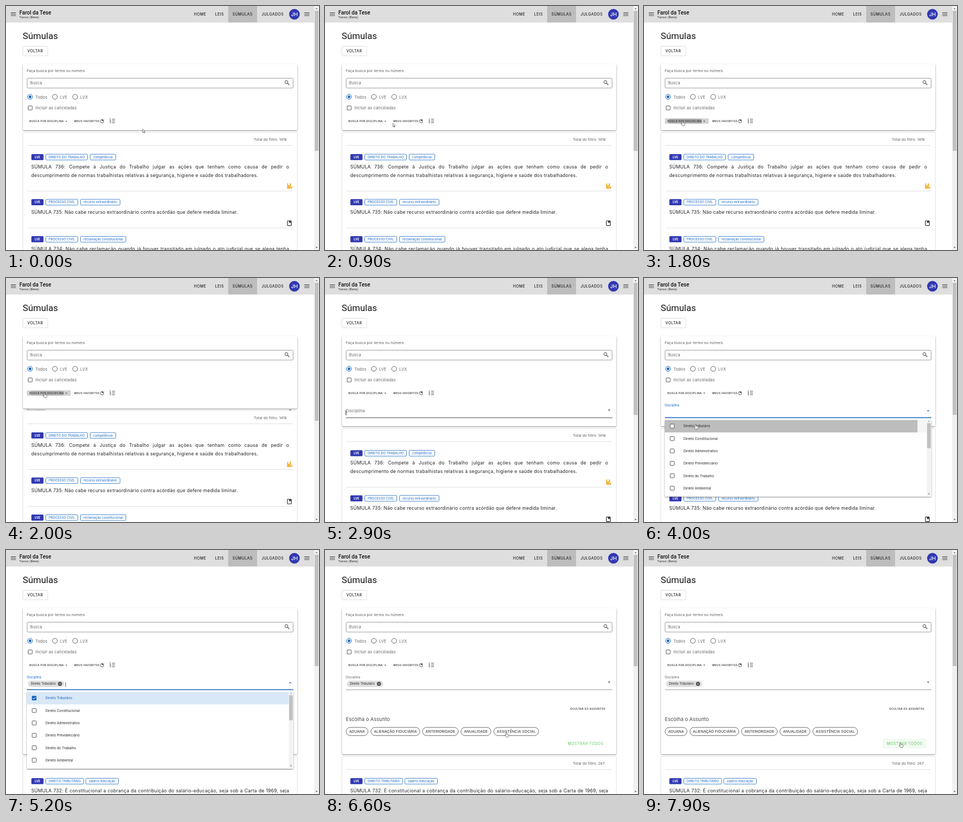
An HTML page that plays this animation: 586 by 458 pixels, repeating every 8000 ms.

```html
<!DOCTYPE html>
<html lang="pt">
<head>
<meta charset="utf-8">
<title>Súmulas</title>
<style>
html, body { margin: 0; width: 100%; height: 100%; overflow: hidden; background: #fff }
svg { display: block; width: 586px; height: 458px; font-family: Inter, sans-serif; fill: #222 }
.brand { font: 500 10px Roboto, sans-serif; fill: #111 }
.sub { font: 6px Roboto, sans-serif; letter-spacing: .3px }
.title { font: 17px Roboto, sans-serif; fill: #111 }
.nav { font-size: 6.9px; font-weight: 500; letter-spacing: .5px }
.avatar { font-size: 9.5px; font-weight: 500; fill: #fff }
.hint { font-size: 6.7px; letter-spacing: .12px; fill: #555 }
.field { font-size: 7.4px; letter-spacing: .2px; fill: #666 }
.tiny { font-size: 4.8px; font-weight: 500; letter-spacing: .42px }
.tag { font-size: 5.9px; letter-spacing: .04px; fill: #1565c0 }
.court { font-size: 5.6px; font-weight: 700; fill: #fff }
.label { font-size: 5.9px; fill: #666 }
.chip { font-size: 5.9px }
.option { font-size: 6.35px }
.heading { font-size: 9.2px; letter-spacing: .15px; fill: #444 }
.pill { font-size: 6.8px; letter-spacing: .1px }
.law { font: 8.6px/14px Inter, sans-serif; letter-spacing: .26px; color: #222; white-space: nowrap }
.full { text-align-last: justify }
.shade { filter: drop-shadow(0 1px 1.3px #0007) }
</style>
</head>
<body>
<svg id="stage" viewBox="0 0 586 458"></svg>
<script>
const stage = document.getElementById('stage');
const BLUE = '#1565c0', INDIGO = '#3038b0', GREEN = '#76d275';

const clamp = v => Math.max(0, Math.min(1, v));
const ease = (t, a, b) => { const k = clamp((t - a) / (b - a)); return k * k * (3 - 2 * k); };

// Vertical positions of text are the middle of the capitals.
const text = (x, y, cls, s, more = '') => `<text x="${x}" y="${y}" dy=".36em" class="${cls}" ${more}>${s}</text>`;
const mid = 'text-anchor="middle"';
const rect = (x, y, w, h, fill, more = '') => `<rect x="${x}" y="${y}" width="${w}" height="${h}" fill="${fill}" ${more}/>`;
const path = (d, fill, more = '') => `<path d="${d}" fill="${fill}" ${more}/>`;
const line = (x1, x2, y, color, w = 1) => path(`M${x1} ${y}H${x2}`, 'none', `stroke="${color}" stroke-width="${w}"`);
const ring = (x, y, r, color) => `<circle cx="${x}" cy="${y}" r="${r}" fill="none" stroke="${color}"/>`;
const dot = (x, y, r, color) => `<circle cx="${x}" cy="${y}" r="${r}" fill="${color}"/>`;
const burger = x => [12.5, 15.2, 18].map(y => line(x, x + 9.5, y, '#333', .9)).join('');
const arrow = (x, y, r, up, fill = '#444') => path(`M${x - r} ${y}h${2 * r}l${-r} ${up ? -r : r}z`, fill);
const law = (y, s, full) => `<foreignObject x="47.3" y="${y - 7}" width="483" height="15"><div class="law ${full ? 'full' : ''}">${s}</div></foreignObject>`;

function checkbox(x, y, on) {
  return on
    ? rect(x, y, 8.5, 8.5, BLUE, 'rx="1"') + path(`M${x + 1.7} ${y + 4.3}l2 2l3.4-3.9`, 'none', 'stroke="#fff"')
    : rect(x + .5, y + .5, 7.6, 7.6, '#fff', 'rx=".8" stroke="#555"');
}

function bookmark(x, y, s) {
  return rect(x, y, 7.5 * s, 8.8 * s, 'none', `rx=".8" stroke="#222" stroke-width="${1.1 * s}"`) +
    path(`M${x + 3.4 * s} ${y}h${3 * s}v${4.3 * s}l${-1.5 * s} ${-s}l${-1.5 * s} ${s}z`, '#222');
}

function favorite(x, y) {
  return path(`M${x} ${y}h7.5v5l-2 1v4H${x}z`, '#f5b53d') +
    path(`M${x + 2} ${y}h3v4l-1.5-1l-1.5 1z`, '#fff') +
    path(`M${x + 7.6} ${y + 10.4}l-2.5-2.6q-.3-2 1.4-1.9l1.1.8l1.1-.8q1.9 0 1.4 1.9z`, '#f5b53d');
}

function tags(y, ...items) {
  return rect(47.5, y - 5.7, 22.7, 11.4, INDIGO, 'rx="1.6"') + text(58.9, y, 'court', 'LVE', mid) +
    items.map(([x, w, s]) => rect(x + .5, y - 5.4, w - 1, 10.8, '#fff', `rx="1.8" stroke="${BLUE}" stroke-width=".8"`) +
      text(x + w / 2, y, 'tag', s, mid)).join('');
}

function header() {
  const menu = [[352, 'HOME'], [391.5, 'LEIS'], [424, 'SÚMULAS'], [478.5, 'JULGADOS']];
  return rect(0, 0, 577, 31, '#dedede') + rect(416, 0, 54, 31, '#bdbdbd') + burger(9) + burger(558.5) +
    text(25, 12.3, 'brand', 'Farol da Tese') + text(25, 21, 'sub', 'Tavos (Beta)') +
    menu.map(([x, s]) => text(x, 15.5, 'nav', s)).join('') +
    dot(540, 15.5, 10, INDIGO) + text(540, 15.5, 'avatar', 'JH', mid);
}

function scrollbar(bottom) {
  return rect(577, 0, 9, 458, '#f1f1f1') + rect(578, 9, 7, bottom - 9, '#c1c1c1') +
    arrow(581.5, 6, 2, true, '#666') + arrow(581.5, 452.5, 2, false, '#444');
}

function search(t, opened) {
  const hover = t > 1250 && t < 2450;
  const ripple = clamp((t - 1750) / 50) * (1 - ease(t, 1900, 2200));
  let s = text(39, 121.5, 'hint', 'Faça busca por termo ou número.') +
    rect(39.5, 135.5, 498, 18.5, '#fff', 'rx="2" stroke="#999"') + text(45, 144.5, 'field', 'Busca') +
    ring(525, 142.8, 2.8, '#444') + path('M527 145l3.4 3.4', 'none', 'stroke="#444" stroke-width="1.3"') +
    ring(45, 170.5, 4.6, BLUE) + dot(45, 170.5, 2.5, BLUE) + ring(91.5, 170.5, 4.6, '#555') + ring(129.5, 170.5, 4.6, '#555') +
    text(55, 171, 'field', 'Todos') + text(101, 171, 'field', 'LVE') + text(139, 171, 'field', 'LVX') +
    checkbox(41, 187, false) + text(55, 191.5, 'field', 'Incluir as canceladas');
  if (hover) s += rect(39, 211, 82, 10, '#d2d2d2', 'rx="1.5"') + rect(46, 211.7, 62, 8.6, '#aaa', `rx="2" opacity="${ripple}"`);
  s += text(44, 216.5, 'tiny', 'BUSCA POR DISCIPLINA') +
    (opened ? arrow(112.8, 215.6, 1.6, false, '#222') : path('M112 214.7v3.2l1.7-1.6z', '#222')) +
    text(128, 216.5, 'tiny', 'MEUS FAVORITOS') + bookmark(177.5, 213.3, .65);
  for (let i = 0; i < 3; i++)
    s += line(198.5, 204, 212.5 + i * 3.2, '#333', .9) + text(194, 212.5 + i * 3.2, '', i + 1, 'font-size="4" font-weight="600"');
  return s;
}

function discipline(t, chosen, focus) {
  const small = ease(t, 3500, 3650);
  const color = focus ? BLUE : '#666';
  let s = small > .5 ? text(39, 239, 'label', 'Disciplina', `style="fill:${color}"`) : text(39, 249.5, 'field', 'Disciplina');
  s += line(39, 538, 262.3, focus ? BLUE : t < 3500 ? '#333' : '#888', focus ? 1.4 : .9) +
    arrow(532, focus ? 250 : 247.3, 2.3, focus, focus ? BLUE : '#444');
  if (chosen) s += rect(41, 245.3, 68, 12, '#dfdfdf', 'rx="6"') + text(46.5, 251.3, 'chip', 'Direito Tributário') +
    dot(101, 251.3, 3.7, '#444') + path('M99.6 249.9l2.8 2.8m0-2.8l-2.8 2.8', 'none', 'stroke="#eee" stroke-width=".9"');
  if (focus && chosen && t % 1000 < 500) s += rect(111.2, 248, .9, 9, BLUE);
  return s;
}

function subjects(t) {
  const pills = [[39, 42, 'ADUANA'], [85.5, 92.5, 'ALIENAÇÃO FIDUCIÁRIA'], [182, 68, 'ANTERIORIDADE'],
    [254, 57, 'ANUALIDADE'], [315.5, 85, 'ASSISTÊNCIA SOCIAL']];
  return text(459, 298, 'tiny', 'OCULTAR OS ASSUNTOS') + text(39, 317.5, 'heading', 'Escolha o Assunto') +
    pills.map(([x, w, s]) => rect(x + .5, 333, w - 1, 15.3, '#fff', 'rx="7.6" stroke="#555" stroke-width=".9"') +
      text(x + w / 2, 340.8, 'pill', s, mid)).join('') +
    rect(447, 354, 82, 18.5, '#f1fbf1', `rx="2" opacity="${ease(t, 7350, 7550)}"`) +
    text(454.5, 363.7, 'nav', 'MOSTRAR TODOS', `style="fill:${GREEN}"`);
}

function list(dy, filtered) {
  let s = rect(31.5, 237, 514, 400, '#fff', 'rx="2" stroke="#e2e2e2"') +
    text(464, 250.2, 'hint', 'Total do filtro: ' + (filtered ? 267 : 1416)) + line(40, 537, 261.7, '#ddd', .9);
  if (filtered) {
    s += tags(283.6, [74, 72, 'DIREITO TRIBUTÁRIO'], [149, 62, 'salário-educação']) +
      law(302, 'SÚMULA 732: É constitucional a cobrança da contribuição do salário-educação, seja sob a Carta de 1969, seja', true);
  } else {
    s += tags(283.6, [74, 79, 'DIREITO DO TRABALHO'], [157, 49, 'competência']) +
      law(302, 'SÚMULA 736: Compete à Justiça do Trabalho julgar as ações que tenham como causa de pedir o', true) +
      law(317.7, 'descumprimento de normas trabalhistas relativas à segurança, higiene e saúde dos trabalhadores.') +
      favorite(526.3, 333) + line(40, 537, 347.4, '#ddd', .9) +
      tags(368.3, [74, 61, 'PROCESSO CIVIL'], [139, 75, 'recurso extraordinário']) +
      law(387, 'SÚMULA 735: Não cabe recurso extraordinário contra acórdão que defere medida liminar.') +
      bookmark(526.8, 403.3, 1) + line(40, 537, 416.6, '#ddd', .9) +
      tags(437.8, [74, 61, 'PROCESSO CIVIL'], [139, 86, 'reclamação constitucional']) +
      law(456.3, 'SÚMULA 734: Não cabe reclamação quando já houver transitado em julgado o ato judicial que se alega tenha', true);
  }
  return `<g transform="translate(0 ${dy})">${s}</g>`;
}

function dropdown(t, chosen) {
  const names = ['Tributário', 'Constitucional', 'Administrativo', 'Previdenciário', 'do Trabalho', 'Ambiental'];
  let s = rect(39, 266.5, 499, 144, '#fff', 'class="shade"');
  if (chosen) s += rect(39, 266.5, 490.5, 23.3, '#d9e8f6');
  else if (t > 3700) s += rect(39, 266.5, 490.5, 23.3, '#f5f5f5') +
    rect(39, 266.5, Math.min(490.5, 473 * clamp((t - 3800) / 150)), 23.3, '#bdbdbd');
  names.forEach((name, i) => {
    const y = 278 + i * 23.3, on = chosen && !i;
    s += checkbox(48.5, y - 4.3, on) + text(74, y + .2, 'option', 'Direito ' + name, on ? `style="fill:${BLUE}"` : '');
  });
  s += rect(529.5, 266.5, 8, 144, '#f3f3f3') + rect(530, 272.5, 7, 47, '#c1c1c1') +
    arrow(533.5, 269.5, 1.7, true, '#888') + arrow(533.5, 404.5, 1.7, false);
  return `<g opacity="${ease(t, 3550, 3700) * (1 - ease(t, 6000, 6150))}">${s}</g>`;
}

// Pointer stops: time, x, y
const stops = [[0, 256, 231], [200, 256, 231], [1300, 72, 215.5], [2300, 72, 215.5], [2750, 39.3, 253], [3000, 39.3, 253],
  [3450, 97, 250], [3600, 97, 250], [3800, 96.5, 274.5], [5000, 96.5, 274.5], [5150, 600, 300], [5650, 600, 304],
  [5700, 577, 305], [5950, 577, 305], [6500, 339.3, 342], [6900, 339.3, 342], [7500, 480.5, 361.5], [8000, 480.5, 361.5]];
const kinds = [[1200, 'arrow'], [2400, 'hand'], [2550, 'arrow'], [3550, 'beam'], [5000, 'hand'], [6400, 'arrow'],
  [6950, 'hand'], [7350, 'arrow'], [8001, 'hand']];
const shapes = {
  arrow: 'M0 0v6.6l1.5-1.4l1.1 2.4l1.1-.5l-1.1-2.3h2.1z',
  hand: 'M0 0q.9 0 .9 1v2.5l3 .7q.9.3.8 1.3l-.4 2.3l-.8 1.4h-3.6l-2.4-3q-.4-1 .7-.9l.9.8V1q0-1 .9-1z',
  beam: 'M-.3-4.5h.6v9h-.6z'
};

function pointer(t) {
  const i = stops.findIndex(s => s[0] > t), [a, x0, y0] = stops[i - 1], [b, x1, y1] = stops[i];
  const k = ease(t, a, b), kind = kinds.find(s => t < s[0])[1];
  return path(shapes[kind], kind === 'beam' ? '#333' : '#fff',
    `stroke="#444" stroke-width=".7" transform="translate(${x0 + (x1 - x0) * k} ${y0 + (y1 - y0) * k})"`);
}

function draw(t) {
  const open = ease(t, 1900, 2200), grow = ease(t, 4200, 4350);
  const dy = 45.3 * open + 105 * grow;
  const chosen = t >= 4150, filtered = t >= 4280, focus = t >= 3500 && t < 6000;
  return header() + text(31.3, 56, 'title', 'Súmulas') +
    rect(31.5, 75.5, 46.5, 18, '#fff', 'rx="2" stroke="#ddd"') + text(40, 84.7, 'nav', 'VOLTAR') +
    rect(31.5, 109, 514, 124 + dy, '#fff', 'rx="2" class="shade"') + search(t, t >= 1900) +
    (open ? discipline(t, chosen, focus) : '') + (grow ? subjects(t) : '') + list(dy, filtered) +
    (t > 3550 && t < 6150 ? dropdown(t, chosen) : '') +
    scrollbar(272 - 15 * open - 39 * grow) + pointer(t);
}

let shown = '';
function tick(now) {
  const next = draw(now % 8000);
  if (next !== shown) stage.innerHTML = shown = next;
  requestAnimationFrame(tick);
}
tick(performance.now());
</script>
</body>
</html>
```
